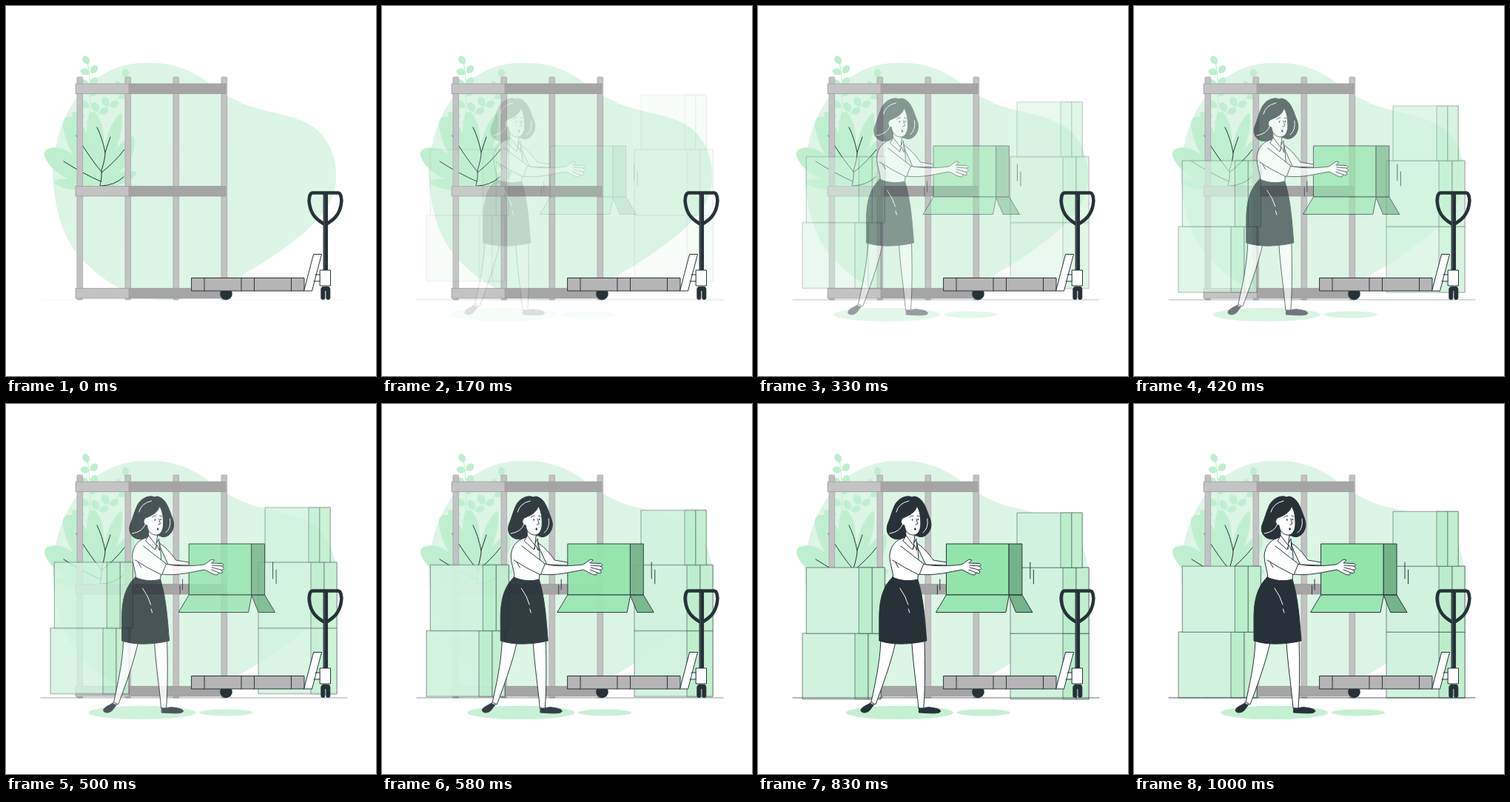
Recreate the animation shown at these times as an HTML page. Size 500x500 px, loop 1040 ms.

```html
<!DOCTYPE html>
<html lang="en">
<head>
<meta charset="utf-8">
<title>Warehouse</title>
<style>
  html, body { margin: 0; height: 100%; overflow: hidden; background: #fff; }
  svg { display: block; width: 100vw; height: 100vh; }
  .ink { fill: none; stroke: #263238; stroke-linecap: round; stroke-linejoin: round; }
  .white { fill: #fff; }
  .dark { fill: #263238; }
  .thick { stroke-width: 4.5; }
  .post { fill: #c2c2c2; stroke: #a8a8a8; stroke-width: .8; }
</style>
</head>
<body>
<svg viewBox="0 0 500 500">
  <defs>
    <g id="crate" stroke="#263238" stroke-opacity=".62" stroke-width=".9">
      <path fill="#d1f3dd" d="M0 0H106V89H0Z"/>
      <path fill="#bceecc" d="M71 0H89V89H71Z"/>
      <path fill="#c1efcf" d="M89 0H106V89H89Z"/>
    </g>
    <path id="leaf" d="M0 0C-7 -3 -7 -10 -2 -13C5 -11 6 -4 0 0Z"/>
    <g id="post" class="post"><rect y="96" width="7.6" height="301" rx="1"/></g>
    <g id="beam" stroke="#999" stroke-width=".7">
      <path fill="#a5a5a5" d="M165.500 0H297V13.500H165.500Z"/>
      <path fill="#c3c3c3" d="M94 0H166V13.500H94Z"/>
    </g>
  </defs>

  <path fill="#dcf5e5" d="M185 77C215 75 242 82 267 99C290 116 310 131 345 140C385 149 410 155 425 172C440 188 447 210 446 235C445 264 425 287 402 307C374 330 340 353 308 370C280 386 245 398 212 397C160 396 115 360 92 329C72 300 64 262 63 222C65 180 82 133 110 108C132 88 155 78 185 77Z"/>

  <!-- plant -->
  <g fill="#bfefce">
    <path fill="none" stroke="#bfefce" d="M110 76Q115 100 113 150M105 160Q128 145 160 118M152 126Q160 110 162 95"/>
    <g id="sprigs"></g>
    <path d="M127 242C100 245 60 228 52 202C50 187 75 189 90 200C110 212 122 224 127 242Z"/>
    <path d="M126 242C100 225 75 180 77 156C82 143 100 152 108 170C118 195 125 215 126 242Z"/>
    <path d="M128 242C112 212 104 168 113 144C123 139 134 160 132 190Q132 220 128 242Z"/>
    <path d="M129 242C126 210 135 160 156 144C160 158 154 190 129 242Z"/>
    <path d="M129 242C132 215 152 180 172 176C178 185 172 220 129 242Z"/>
    <path d="M127 247C100 252 70 247 65 238C70 230 105 233 127 247ZM130 243C140 229 160 219 176 224C175 236 155 245 130 243Z"/>
  </g>
  <path class="ink" d="M127 243Q130 230 129 222Q134 207 134 198Q130 178 123 164M134 198L141 177M129 225Q146 212 160 194M129 224Q113 205 95 175M128 237Q105 227 78 210M128 243Q146 243 159 231"/>

  <!-- shelf -->
  <use href="#post" x="96"/><use href="#post" x="161"/><use href="#post" x="226"/><use href="#post" x="291"/>
  <use href="#beam" y="105"/><use href="#beam" y="243.500"/><use href="#beam" y="381.500"/>

  <g id="crates">
    <use href="#crate" x="60" y="308"/><use href="#crate" x="65.300" y="219.200"/>
    <use href="#crate" x="341" y="308"/><use href="#crate" x="341" y="219.200"/>
    <use href="#crate" transform="translate(350 145.200) scale(.831)"/>
  </g>

  <path id="floor" class="ink" stroke-width=".8" d="M47 397H461"/>

  <!-- pallet truck -->
  <g class="ink">
    <circle class="dark" cx="297.500" cy="389" r="8.300" stroke="none"/>
    <path fill="#b5b5b5" d="M251 367.500H403V385H251ZM268 367.500V385M318 367.500V385M335.500 367.500V385M385.500 367.500V385"/>
    <path class="white" d="M416 335.500H426.500L413.500 385H403ZM418 363H425V372H416"/>
    <path class="thick" d="M414 252.500H449C453 253 454 262 453 267C451 282 443 289 431.500 295.500C420 289 412 282 410 267C409 262 410 253 414 252.500Z"/>
    <path stroke-width="6.500" stroke-linecap="butt" d="M431.800 252V357"/>
    <path stroke="#65727a" stroke-width=".7" d="M430 256V355"/>
    <path class="white" d="M424.500 357H438.500V378H424.500Z"/>
    <path stroke-width="6" d="M428.300 383V394M435.300 383V394M429 382H435"/>
  </g>

  <g id="worker" class="ink">
    <g fill="#c5f0d2" stroke="none">
      <ellipse cx="189.500" cy="417" rx="72.500" ry="9.300"/>
      <ellipse cx="303" cy="417" rx="36" ry="4.500"/>
    </g>
    <!-- far arm -->
    <path class="white" d="M211 187C219 191 229 202 235 211L253 214V218L225 217Z"/>
    <!-- carton -->
    <path fill="#93e4ab" d="M253 189H337.500V258H253Z"/>
    <path fill="#74b488" d="M337.500 189H355V258H337.500ZM337.500 258H355L369 281.500H347Z"/>
    <path fill="#9ae6b1" d="M253 258H337.500L333 281.500H239Z"/>
    <path d="M366 214V236M370.500 224V243M240.500 245V257M244 237V251"/>
    <!-- legs and shoes -->
    <path class="white" d="M164 320C163 350 156 380 151 403L157 406C165 385 178 350 184 322ZM206 322C208 355 213 385 215 411H222C224 385 224 350 223 319Z"/>
    <path class="dark" d="M150 404C146 407 138 409 137 414C138 418 145 418 149 414L155 406Q151 407 150 404ZM216 411C221 413 226 409 231 410C238 411 244 412 245 415C244 419 232 418 216 417Z"/>
    <!-- torso and skirt -->
    <path class="white" d="M197 180C185 183 177 191 176 205C176 217 181 225 181 237Q200 242 214 238C215 222 216 205 213 187Z"/>
    <path class="dark" d="M180 234C166 248 162 266 162 290V320C180 326 205 325 226 320C224 295 222 262 214 237C203 240 190 239 180 234Z"/>
    <path stroke="#fff" d="M190 249Q198 260 201 271M201.500 277L203 282"/>
    <!-- head -->
    <path class="dark" d="M206 126C199 122 186 128 182 139C178 148 177 154 174 161C170 170 173 179 182 182C189 184 196 181 200 177L213 178C219 182 226 178 229 173C234 165 232 158 229 151C225 140 221 127 210 125Q208 125 206 126Z"/>
    <path class="white" d="M198 170V182L208 196L210 177Z"/>
    <path class="white" d="M196 153C205 150 211 145 213 138C217 145 218 152 218 162C218 172 213 178 207 177C201 176 197 172 196 164C190 163 190 155 196 153Z"/>
    <path class="white" d="M198 178L194 185L207 197L209 190L213 198L212 182L208 190Z"/>
    <path stroke-width=".9" d="M203 153Q206 150 208 151M213 151L216 152M212 155L214 162L211 163"/>
    <ellipse class="dark" cx="206.800" cy="156.500" rx=".8" ry="1.300" stroke="none"/>
    <ellipse class="dark" cx="214.500" cy="156" rx=".8" ry="1.300" stroke="none"/>
    <ellipse class="dark" cx="210.500" cy="169" rx="1.300" ry="1.800" stroke="none"/>
    <path stroke="#fff" d="M185 146Q188 134 202 131M176 175Q190 173 194 162M221 174Q229 168 227 155"/>
    <!-- near arm and hand -->
    <path class="white" d="M221 216C235 220 257 219 273 217C278 215 280 211 284 210L287 211L283 215L297 215.500C301 217 300 219 297 219L299 221C301 223 299 224 296 224L298 227C298 229 296 229 293 228L291 231C285 231 279 226 274 224C260 226 237 233 216 230Z"/>
    <path d="M284 218L297 219M284 221L296 224M283 224L293 228"/>
    <path class="white" stroke="none" d="M187 190L222 216L216 231L180 211Z"/>
    <path d="M191 192L222 216L216 231Q195 221 180 211M184 214L188 221"/>
  </g>
</svg>
<script>
  const $ = id => document.getElementById(id);

  // x, y, angle and size of each small leaf, from its base
  const leaves = [
    [111, 79, -18, 1], [114, 90, 55, 1], [113, 91, -65, 1], [114, 106, 55, 1], [112, 107, -60, 1],
    [113, 121, 60, .9], [112, 137, -50, 1.1], [100, 154, -35, 1.1], [106, 150, -65, 1],
    [124, 143, -20, 1.1], [137, 136, -15, 1.1], [126, 144, 80, 1], [140, 135, 80, 1],
    [152, 124, 75, .9], [154, 112, -15, .9], [161, 98, 10, 1], [113, 156, 40, 1.1]
  ];
  $("sprigs").innerHTML = leaves.map(([x, y, turn, size]) =>
    `<use href="#leaf" transform="translate(${x} ${y}) rotate(${turn}) scale(${size})"/>`).join("");

  const LOOP = 1040, STEP = 1000 / 24, SLIDE = 30;
  const bezier = (a, b, s) => 3 * a * s * (1 - s) ** 2 + 3 * b * s * s * (1 - s) + s ** 3;

  // cubic-bezier(.36, -.01, .5, 1.38): settles after a slight overshoot
  function ease(x) {
    let low = 0, high = 1;
    for (let i = 0; i < 24; i++) {
      const mid = (low + high) / 2;
      if (bezier(.36, .5, mid) < x) low = mid; else high = mid;
    }
    return bezier(-.01, 1.38, low);
  }

  function place(id, dx, dy, opacity) {
    $(id).setAttribute("transform", `translate(${dx} ${dy})`);
    $(id).style.opacity = Math.max(0, Math.min(1, opacity));
  }

  function draw(now) {
    const tick = Math.floor((now % LOOP + 5) / STEP);
    const x = tick < 2 ? 1 / 24 : Math.min(1, (tick + 1) / 24);
    const p = ease(x), shift = SLIDE * (p - 1);
    place("crates", 0, shift, p);
    place("worker", shift, 0, p);
    place("floor", 0, 0, x);
  }

  const start = performance.now();
  function loop() {
    draw(performance.now() - start);
    requestAnimationFrame(loop);
  }
  loop();
</script>
</body>
</html>
```
